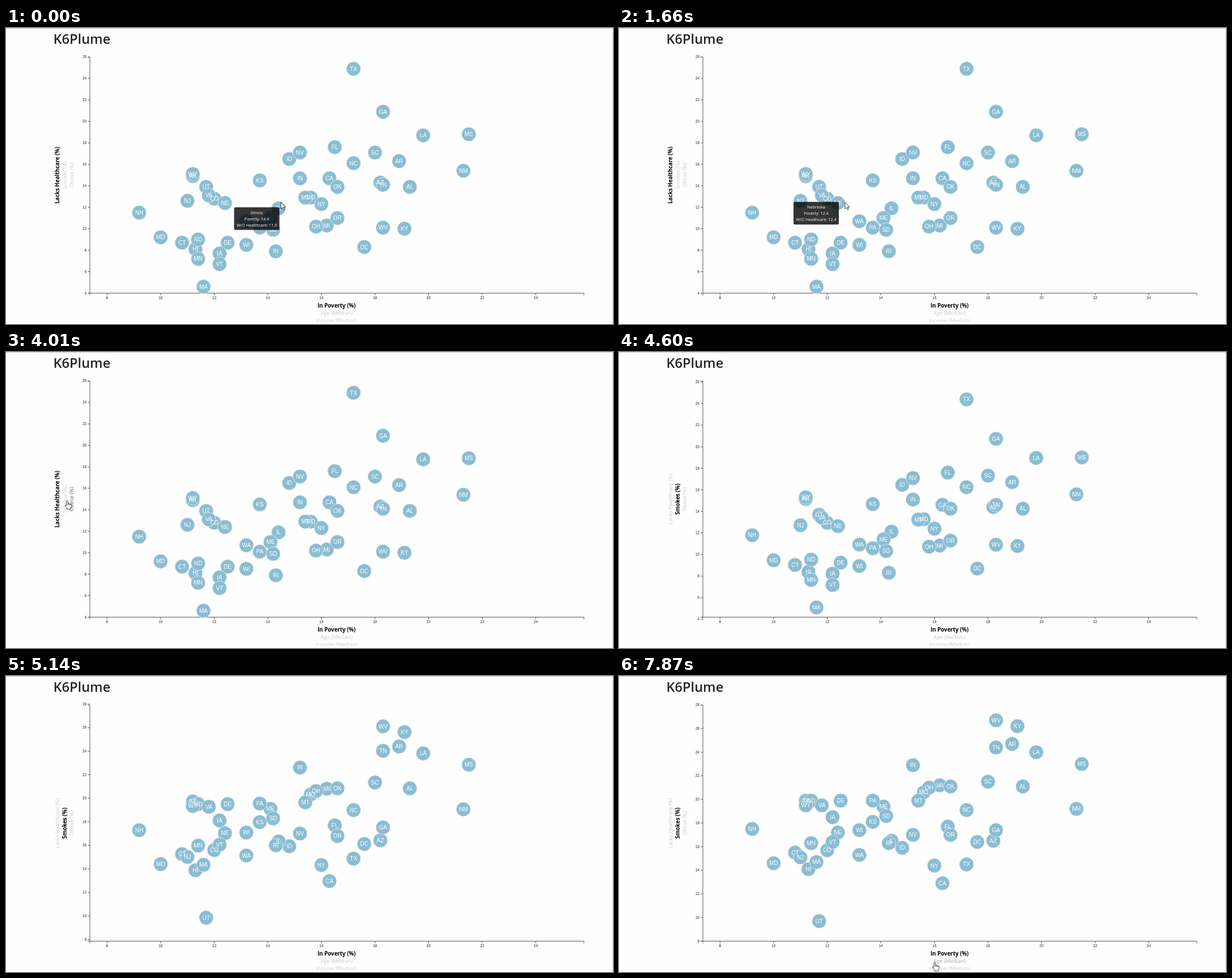
Animation of 1071x523 px, one loop 8 s. Source, as an HTML page:

```html
<!DOCTYPE html>
<html lang="en">
<head>
<meta charset="utf-8">
<title>K6Plume</title>
<style>
  html, body { margin: 0; width: 100%; height: 100%; overflow: hidden; background: #fefefe; }
  svg { display: block; width: 100%; height: 100%; }
  .ui { font-family: "Open Sans", "Noto Sans", sans-serif; }
  .title { font-size: 23.6px; font-weight: 600; fill: #212529; }
  .axis { fill: none; stroke: #444; stroke-width: .9; }
  .tick { font: 6.3px "Liberation Sans", Arial, sans-serif; fill: #222; }
  .dot { fill: #89bdd3; stroke: #e3e3e3; stroke-width: 1; }
  .code { font: 10px "Liberation Sans", Arial, sans-serif; fill: #fff; text-anchor: middle; }
  .label { font-size: 9.3px; fill: #ccc; text-anchor: middle; }
  .label.on { font-size: 9.7px; font-weight: 700; fill: #000; }
  .tip { font-size: 7.2px; fill: #fff; text-anchor: middle; }
</style>
</head>
<body>
<svg id="stage" viewBox="0 0 1071 523" preserveAspectRatio="none"></svg>
<script>
const LOOP = 8000;
const mix = (a, b, k) => a + (b - a) * k;
const clamp = k => Math.min(1, Math.max(0, k));
const cubic = k => k < .5 ? 4 * k ** 3 : 1 - 4 * (1 - k) ** 3;

// States in rising order: "=" joins ties, ranks without a value are spaced evenly
function ranking(text) {
  const ranks = text.split(" ").map(s => s.split(":"));
  const anchors = ranks.map((r, i) => [i, +r[1]]).filter(a => a[1]);
  const values = {};
  ranks.forEach(([codes], i) => {
    const n = Math.max(1, anchors.findIndex(a => a[0] >= i));
    const [a, low] = anchors[n - 1], [b, high] = anchors[n];
    const value = Math.round(mix(low, high, (i - a) / (b - a)) * 10) / 10;
    for (const c of codes.split("=")) values[c] = value;
  });
  return values;
}
const poverty = ranking("NH:9.2 MD CT:10.8 NJ AK=WY:11.2 HI MN=ND MA UT VA:11.8 CO IA=VT NE:12.4 DE:12.5 " +
  "WA=WI:13.2 KS=PA ME:14.1 SD RI IL:14.4 ID IN=NV:15.2 MT MO OH NY MI:16.2 CA FL OK=OR:16.6 " +
  "NC=TX:17.2 DC SC:18 AZ GA=TN=WV:18.3 AR:18.9 KY AL:19.3 LA:19.8 NM:21.3 MS:21.5");
const uninsured = ranking("MA:4.6 VT:6.7 MN IA:7.7 RI HI DC WI CT=DE:8.7 ND MD:9.2 SD:9.9 KY PA=WV OH MI:10.3 " +
  "WA ME=OR:11 NH IL:11.9 NY:12.3 NE:12.4 NJ CO MO=MT VA:13.1 AL=OK=UT:13.9 TN AZ KS CA=IN AK WY:15.1 " +
  "NM:15.4 NC:16.1 AR ID:16.5 NV=SC FL:17.6 LA:18.7 MS:18.8 GA:20.9 TX:24.9");
const smokes = ranking("UT:9.7 CA:12.9 HI:14.1 NY:14.4 TX MD MA:14.7 NJ:15.1 WA CT CO ID:15.9 MN=RI:16.3 " +
  "DC=VT AZ=IL:16.5 NV=OR:17 NE GA=WI NH FL:17.7 KS IA:18.5 SD:18.6 NC:19.1 NM ME VA=WY:19.5 " +
  "AK=DE=MT=ND=PA:19.9 MO:20.6 OH:21 AL=OK MI:21.2 SC:21.5 IN:22.9 MS:23 LA:24 TN AR:24.7 KY:26.2 WV:26.7");

const LEFT = 148, TOP = 51.2, BASE = 468.5;
const xAt = v => LEFT + (v - 7.36) * 47.28;
const scale = (low, high) => v => mix(BASE, TOP, (v - low) / (high - low));
const yHealth = scale(4, 26), ySmoke = scale(8, 28);

const stage = document.getElementById("stage");
function add(parent, name, attrs, text) {
  const el = document.createElementNS("http://www.w3.org/2000/svg", name);
  for (const k in attrs) el.setAttribute(k, attrs[k]);
  if (text !== undefined) el.textContent = text;
  parent.appendChild(el);
  return el;
}
const move = (el, x, y) => el.setAttribute("transform", `translate(${x} ${y})`);
const show = (el, on) => el.setAttribute("display", on ? "inline" : "none");

// Page edges and heading
add(stage, "path", { d: "M0 .5H1071", stroke: "#c8c8c8" });
add(stage, "path", { d: "M1070.5 0V523", stroke: "#dcdcdc" });
add(stage, "text", { class: "ui title", x: 83.5, y: 27.7 }, "K6Plume");

// The chart has its own clipped area
const clip = add(add(stage, "defs", {}), "clipPath", { id: "area" });
add(clip, "rect", { x: 60, y: 41, width: 1000, height: 478.6 });
const chart = add(stage, "g", { "clip-path": "url(#area)" });

add(chart, "path", { class: "axis", d: `M144 51.4H${LEFT}V${BASE}H144` });
add(chart, "path", { class: "axis", d: `M${LEFT} 472.3V${BASE}H1019.7V472.3` });
for (let v = 8; v <= 24; v += 2) {
  const g = add(chart, "g", { transform: `translate(${xAt(v)} ${BASE})` });
  add(g, "path", { class: "axis", d: "M0 0V3.8" });
  add(g, "text", { class: "tick", y: 10, "text-anchor": "middle" }, v);
}
const yTicks = [];
for (let v = 4; v <= 28; v += 2) {
  const g = add(chart, "g", {});
  add(g, "path", { class: "axis", d: "M-3.8 0H0" });
  add(g, "text", { class: "tick", x: -6, y: 2.1, "text-anchor": "end" }, v);
  yTicks.push({ v, g });
}

// All circles lie below all codes
const states = Object.keys(poverty).sort().map(code => ({
  x: xAt(poverty[code]), from: yHealth(uninsured[code]), to: ySmoke(smokes[code]), code
}));
for (const s of states) s.dot = add(chart, "circle", { class: "dot", r: 12.5 });
for (const s of states) s.text = add(chart, "text", { class: "code" }, s.code);

const label = (text, x, y, turn) => add(chart, "text",
  { class: "ui label", transform: `translate(${x} ${y}) rotate(${turn})` }, text);
const health = label("Lacks Healthcare (%)", 93.8, 260, -90);
const smoke = label("Smokes (%)", 106.5, 260, -90);
const obese = label("Obese (%)", 119.2, 260, -90);
label("In Poverty (%)", 583.2, 494, 0).classList.add("on");
const age = label("Age (Median)", 583.2, 506.8, 0);
label("Income (Median)", 583.2, 519.6, 0);

function tooltip(code, name, what, values, y, width, from, to) {
  const g = add(stage, "g", {});
  move(g, xAt(poverty[code]) - 38.4, y(values[code]) - 2);
  add(g, "rect", { x: -width / 2, width, height: 40, rx: 2.5, fill: "#000", "fill-opacity": .8 });
  [name, `Poverty: ${poverty[code]}`, `${what}: ${values[code]}`].forEach((s, n) =>
    add(g, "text", { class: "ui tip", y: 12 + 11 * n }, s));
  return { g, from, to };
}
const tips = [
  tooltip("IL", "Illinois", "W/O Healthcare", uninsured, yHealth, 80, 0, 580),
  tooltip("NE", "Nebraska", "W/O Healthcare", uninsured, yHealth, 80, 1660, 3030),
  tooltip("UT", "Utah", "Smokes", smokes, ySmoke, 51, 6340, 7010)
];

// Pointers, each with its hot spot at 0,0
const pen = { stroke: "#111", "stroke-width": .8, fill: "#fff", "stroke-linejoin": "round" };
const arrow = add(stage, "path", { ...pen, d: "M0 0V11.6L2.7 9.1L4.7 13.3L6.5 12.5L4.6 8.4H8.2Z" });
const hand = add(stage, "path", { ...pen,
  d: "M-1.3 1.4Q0 -.6 1.2 1.4V5.6Q2.5 4.6 3.4 6Q4.7 5.2 5.6 6.7Q7.5 6.2 7.7 8.2V11L6.2 14V15.8H-.6V14.2L-4 9.6Q-3.6 7.6 -1.3 9.4Z" +
     "M1.2 5.6V8.6M3.4 6V8.8M5.6 6.7V9" });
const beam = add(stage, "path", { d: "M-2 -5H2M0 -5V5M-2 5H2", fill: "none", stroke: "#222", "stroke-width": .8 });

// Pointer moves: start, end, destination
const MOVES = [[560, 1500, 398.7, 308], [2990, 3560, 155, 246], [3700, 3920, 108, 262], [4010, 4195, 103.5, 260],
  [5140, 5540, 361, 361], [5900, 6290, 350, 424], [6980, 7150, 470, 429], [7430, 7840, 557, 505.3]];
const pointer = t => MOVES.reduce(([x, y], [a, b, tx, ty]) => {
  const k = clamp((t - a) / (b - a));
  return [mix(x, tx, k), mix(y, ty, k)];
}, [485, 308]);

const CLICK = 4385, SHIFT = 960, BEAT = 135, PHASE = 10;
function draw(time) {
  const t = Math.max(0, Math.floor((time - PHASE) / BEAT) * BEAT + PHASE);
  const e = cubic(clamp((t - CLICK) / SHIFT));
  const clicked = t >= CLICK;

  for (const { v, g } of yTicks) {
    move(g, LEFT, mix(yHealth(v), ySmoke(v), e));
    g.setAttribute("opacity", v < 8 ? 1 - e : v > 26 ? e : 1);
  }
  for (const s of states) {
    const y = mix(s.from, s.to, e);
    move(s.dot, s.x, y);
    move(s.text, s.x, y + 3.6);
  }

  const onObese = time >= 3860 && time < 4150, onSmoke = time >= 4150 && !clicked, onAge = time >= 7840;
  health.classList.toggle("on", !clicked);
  smoke.classList.toggle("on", clicked);
  smoke.style.fill = onSmoke ? "#777" : "";
  obese.style.fill = onObese ? "#666" : "";
  age.style.fill = onAge ? "#aaa" : "";
  for (const tip of tips) show(tip.g, time >= tip.from && time < tip.to);

  const overLabel = onObese || onSmoke || onAge;
  const overText = clicked && time < 5280;
  const [x, y] = pointer(t);
  for (const [el, on] of [[hand, overLabel], [beam, overText], [arrow, !overLabel && !overText]]) {
    move(el, x, y);
    show(el, on);
  }
}

const start = performance.now();
function frame(now) {
  draw(Math.max(0, now - start) % LOOP);
  requestAnimationFrame(frame);
}
draw(0);
requestAnimationFrame(frame);
</script>
</body>
</html>
```
